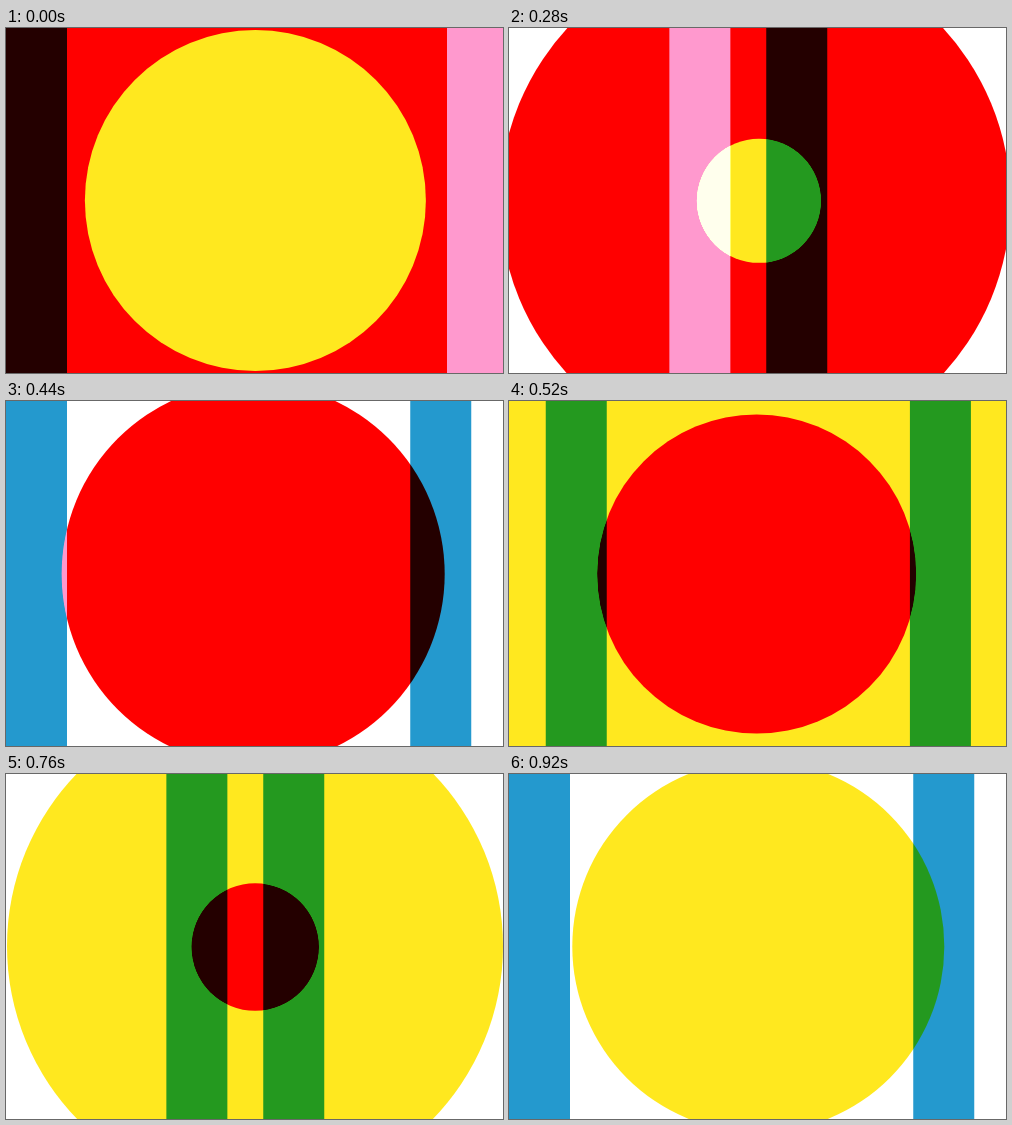
Write an HTML page without scripts that moves like this. It is 497 px wide and 345 px high and loops after 960 ms.

```html
<!DOCTYPE html>
<html lang="en">
<head>
<meta charset="utf-8">
<title>Crossing bars and shrinking discs</title>
<style>
  html, body { margin: 0; width: 100%; height: 100%; overflow: hidden; background: #fff; }
  svg { display: block; width: 497px; height: 345px; }

  /* Small negative delays keep each step clear of its time boundary. */
  .scene { isolation: isolate; animation: show 960ms step-end -2ms infinite; }
  .second { animation-delay: -482ms; }

  .red { fill: #f00; animation: shrink-red 960ms steps(24, jump-start) -2ms infinite; }
  .yellow { fill: #ffe81f; animation: shrink-yellow 960ms steps(24, jump-start) -482ms infinite; }

  .bar { fill: #2499ce; width: 61px; height: 345px; }
  .right { animation: go-right 480ms steps(12, jump-end) -2ms infinite; }
  .left { animation: go-left 480ms steps(12, jump-none) -2ms infinite; }
  .darken { mix-blend-mode: darken; }
  .add { mix-blend-mode: plus-lighter; }

  @keyframes show {
    0% { opacity: 1; }
    50%, 100% { opacity: 0; }
  }
  @keyframes shrink-red {
    from { r: 383px; cx: 244.2px; cy: 173px; }
    to { r: 0px; cx: 250.2px; cy: 173px; }
  }
  @keyframes shrink-yellow {
    from { r: 372px; cx: 248.4px; cy: 171.7px; }
    to { r: 0px; cx: 250.2px; cy: 173.1px; }
  }
  @keyframes go-right {
    from { x: 0px; }
    to { x: 441px; }
  }
  @keyframes go-left {
    from { x: 441px; }
    to { x: 0px; }
  }
</style>
</head>
<body>
<svg viewBox="0 0 497 345">
  <g class="scene first">
    <circle class="red"/>
    <circle class="yellow"/>
    <rect class="bar left add"/>
    <rect class="bar right darken"/>
  </g>
  <g class="scene second">
    <circle class="yellow"/>
    <circle class="red"/>
    <rect class="bar left darken"/>
    <rect class="bar right darken"/>
  </g>
</svg>
</body>
</html>
```
